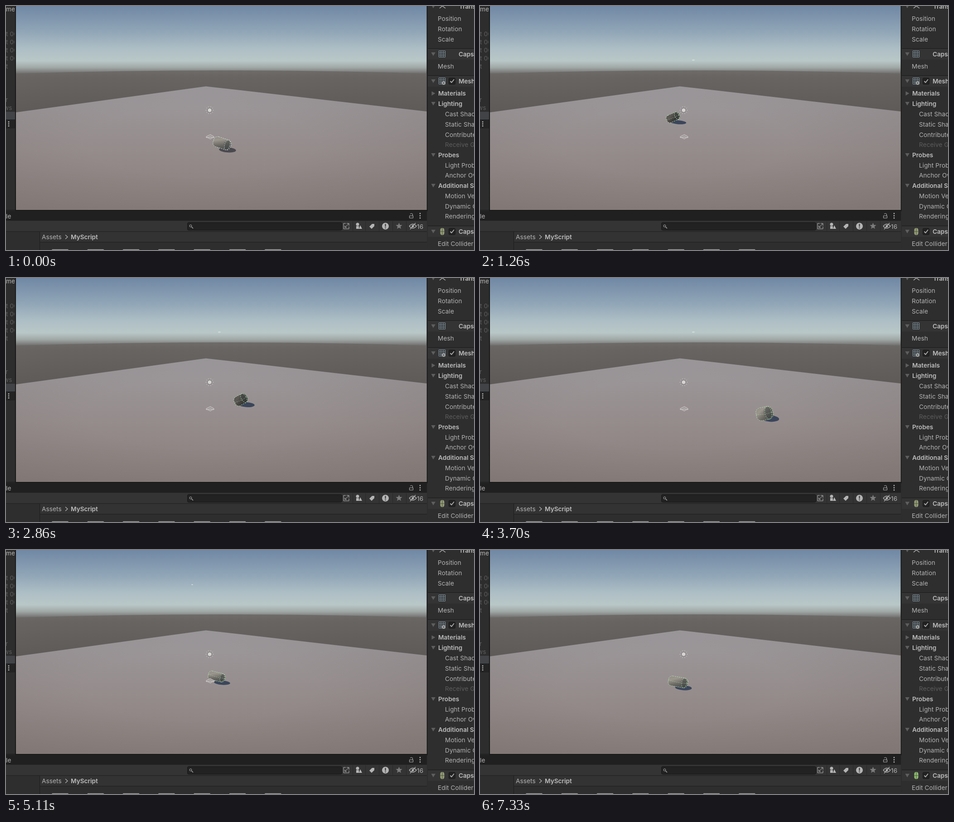
Write an HTML page that moves like this. It is 1033x542 px and loops after 8190 ms.

```html
<!DOCTYPE html>
<html>
<head>
<meta charset="utf-8">
<style>
html, body { margin: 0; width: 100%; height: 100%; overflow: hidden; background: #2d2d2d; }
svg { display: block; width: 1033px; height: 542px; }
text { font: 13.6px Inter, Roboto, sans-serif; letter-spacing: .1px; fill: #b4b4b4; white-space: pre; }
.b { font-weight: 600; letter-spacing: 0; fill: #bdbdbd; }
.d { fill: #5d5d5d; }
.line { fill: none; stroke: #b4b4b4; }
</style>
</head>
<body>
<svg viewBox="0 0 1033 542">
  <defs>
    <linearGradient id="sky" gradientUnits="userSpaceOnUse" x1="0" y1="0" x2="0" y2="152">
      <stop offset="0" stop-color="#7188a5"/>
      <stop offset=".38" stop-color="#91a6b7"/>
      <stop offset=".62" stop-color="#adbec5"/>
      <stop offset=".8" stop-color="#b9c7c7"/>
      <stop offset=".9" stop-color="#a0a8a6"/>
      <stop offset="1" stop-color="#696765"/>
    </linearGradient>
    <linearGradient id="land" x2="0" y2="1">
      <stop offset="0" stop-color="#6e6b69"/>
      <stop offset=".15" stop-color="#676461"/>
      <stop offset="1" stop-color="#5c5957"/>
    </linearGradient>
    <linearGradient id="plane" x2="0" y2="1">
      <stop offset="0" stop-color="#9d9a9d"/>
      <stop offset=".5" stop-color="#958c8c"/>
      <stop offset="1" stop-color="#897f7c"/>
    </linearGradient>
    <radialGradient id="dim" cx=".45" cy=".45" r=".7">
      <stop offset=".4" stop-color="#443b39" stop-opacity="0"/>
      <stop offset="1" stop-color="#443b39" stop-opacity=".12"/>
    </radialGradient>
    <linearGradient id="skin" x2=".8" y2="1">
      <stop offset="0" stop-color="#8d8a82"/>
      <stop offset=".3" stop-color="#9b968e"/>
      <stop offset=".65" stop-color="#6c6a64"/>
      <stop offset="1" stop-color="#484b4a"/>
    </linearGradient>
    <clipPath id="side"><rect width="19" height="453"/></clipPath>
  </defs>

  <!-- Scene view -->
  <rect x="20" width="911" height="456" fill="#191919"/>
  <rect x="22" width="906.500" height="453" fill="url(#sky)"/>
  <path d="M22 150Q475 136 928.500 150V245H22Z" fill="url(#land)"/>
  <path d="M22 236.300L441 178.400L928.500 234.300V453H22Z" fill="url(#plane)"/>
  <path d="M22 236.300L441 178.400L928.500 234.300V453H22Z" fill="url(#dim)"/>
  <ellipse id="speck" fill="#d0dbd8"/>
  <g id="sun" stroke="#d2d0cd" stroke-width=".8">
    <circle cx="449.500" cy="231.500" r="3.800" fill="#d6d4d1"/>
    <circle cx="449.500" cy="231.500" r="5" fill="none" stroke="#716c6d"/>
  </g>
  <g id="stage">
    <path id="gizmo" d="M442 290L451 285.500L459 290V292.500L451 291L442 292.500Z M442 291L451 295.500L459 291" fill="#a09a9a" stroke="#d2d0ce"/>
    <g id="actor">
      <ellipse id="shadow"/>
      <g id="capsule">
        <rect id="shell" fill="url(#skin)"/>
        <ellipse id="cap" fill="#3f4444" fill-opacity=".5"/>
        <g id="wire" fill="none" stroke-width=".9" stroke-dasharray="2.500 2">
          <rect id="edge"/>
          <ellipse id="ring"/>
          <path id="spine"/>
        </g>
      </g>
    </g>
  </g>

  <!-- Hierarchy -->
  <rect width="20" height="453" fill="#2d2d2d"/>
  <rect y="235" width="20" height="17" fill="#414347"/>
  <rect y="252" width="20" height="20" fill="#232323"/>
  <g id="tree" clip-path="url(#side)"></g>

  <!-- Project -->
  <rect y="455" width="929" height="23" fill="#202020"/>
  <rect y="477" width="929" height="24" fill="#343434"/>
  <path d="M0 453.500H929" stroke="#171717"/>
  <rect y="501" width="929" height="41" fill="#2e2e2e"/>
  <rect x="75" y="501" width="854" height="24" fill="#333"/>
  <path d="M0 501H929M74.500 501V542M75 524.500H929" stroke="#1d1d1d"/>
  <rect x="400.500" y="481" width="341" height="17" rx="3" fill="#222" stroke="#151515"/>
  <path d="M765.500 478V500M793.500 478V500M823.500 478V500M853.500 478V500M883.500 478V500" stroke="#292929"/>
  <circle class="line" cx="407.500" cy="488.500" r="2.400"/>
  <path class="line" d="M409.500 490.500L413 494" stroke-width="1.300"/>
  <path class="line" d="M750 483H745V495H757V490M749 491L757 483M752 483H757V488M748 488V492H752"/>
  <g fill="#b4b4b4">
    <circle cx="776" cy="485" r="3.500"/>
    <path d="M773 489H779V495H773ZM782 487L786 495H779Z"/>
    <path d="M802 490L808 484H813V489L807 495Z"/>
    <circle cx="837.500" cy="489" r="7.500"/>
    <path id="star" fill="#7c7c7c"/>
    <circle cx="914" cy="461" r="1.400"/><circle cx="914" cy="466" r="1.400"/><circle cx="914" cy="471" r="1.400"/>
    <circle cx="6" cy="257.500" r="1.400"/><circle cx="6" cy="262" r="1.400"/><circle cx="6" cy="266.500" r="1.400"/>
  </g>
  <path d="M837.500 484V490.500M837.500 492V494" stroke="#333" stroke-width="2"/>
  <path class="line" d="M890 489Q898 480 906 489Q898 498 890 489M892 496L904 482" stroke-width="1.300"/>
  <circle cx="898" cy="489" r="2.500" fill="#b4b4b4"/>
  <path class="line" d="M890.500 466H898.500V471H890.500ZM892 462Q895 459.500 897.500 462V466"/>
  <path class="line" d="M131 508.500L136 513L131 517.500" stroke-width="1.300"/>
  <g id="folders" fill="#a8a8a8"></g>

  <!-- Inspector -->
  <rect x="930.500" width="103" height="542" fill="#2e2e2e"/>
  <g id="heads"></g>
  <g id="folds" fill="#5e5e5e"></g>
  <path class="line" d="M957 5L963 0L970 5M963 0V-3" stroke-width="1.500"/>
  <g class="line" style="stroke: #8397a4">
    <path d="M955.500 99.500H969.500V113.500H955.500ZM960 99V114M965 99V114M955 104H970M955 109H970"/>
    <path d="M955.500 159.500H969.500V173.500H955.500ZM960 159V174M965 159V174M955 164H970M955 169H970"/>
  </g>
  <circle cx="966" cy="171" r="4" fill="#a5a8a8"/>
  <circle cx="966" cy="171" r="1.500" fill="#444"/>
  <g id="checks"></g>
  <rect id="pill" x="958.500" y="493" width="9" height="16" rx="4.500"/>
  <path d="M963 493V509M958.500 501H967.500" stroke="#45503b"/>
  <g id="labels"></g>
</svg>
<script>
const $ = id => document.getElementById(id);
const set = (id, attrs) => { for (const k in attrs) $(id).setAttribute(k, attrs[k]); };
const put = (id, html) => $(id).innerHTML += html;
const label = (x, y, s, cls = '') => `<text x="${x}" y="${y + 5}" class="${cls}">${s}</text>`;

// Static interface
put('tree', label(0, 7, 'me') + [62, 80, 98, 116].map(y => label(0, y, 't 00', 'd')).join('') +
  label(0, 134, 't', 'd') + label(-1, 208, 'r', 'd') + label(-5, 226, 'ws', 'd'));

const rows = [
  [953, 28, 'Position'], [953, 51, 'Rotation'], [953, 74, 'Scale'], [953, 134, 'Mesh'],
  [969, 240, 'Cast Shadows'], [969, 263, 'Static Shadow'], [969, 286, 'Contribute'],
  [969, 308, 'Receive GI', 'd'], [969, 354, 'Light Probes'], [969, 376, 'Anchor Override'],
  [969, 422, 'Motion Vectors'], [969, 445, 'Dynamic Occ'], [969, 467, 'Rendering'],
  [953, 528, 'Edit Collider'], [1000, 1, 'Transform', 'b'], [999, 107, 'Capsule', 'b'],
  [999, 167, 'Mesh Renderer', 'b'], [954, 194, 'Materials', 'b'], [954, 217, 'Lighting', 'b'],
  [954, 331, 'Probes', 'b'], [954, 399, 'Additional Settings', 'b'], [999, 501, 'Capsule', 'b'],
  [0, 467, 'le'], [79, 513, 'Assets'], [143, 513, 'MyScript', 'b'], [907, 490, '16']
];
put('labels', rows.map(r => label(...r)).join(''));
put('heads', [94, 154, 488].map(y =>
  `<path d="M931 ${y}H1033V${y + 25}H931Z" fill="#343434"/><path d="M931 ${y}.5H1033" stroke="#191919"/>`).join(''));
put('folds', [1, 107, 167, 217, 331, 399, 501].map(y => `<path d="M938.500 ${y - 4}H948L943 ${y + 4}Z"/>`).join('') +
  '<path d="M939.500 189.500V199L947.500 194Z"/>');
put('checks', [167, 501].map(y =>
  `<rect x="977.500" y="${y - 7}" width="14" height="14" rx="2" fill="#222" stroke="#161616"/>
   <path class="line" d="M980.500 ${y}L983.500 ${y + 3}L989 ${y - 4}" stroke-width="1.800"/>`).join(''));
for (let i = 0; i < 7; i++) put('folders', `<rect x="${101 + 78.3 * i}" y="540.600" width="37" height="8" rx="2"/>`);
let rays = '', star = '';
for (let i = 0; i < 10; i++) {
  const a = i * Math.PI / 5, c = Math.cos(a), s = Math.sin(a), r = i % 2 ? 3.3 : 7.5;
  rays += `M${449.5 + 6.5 * c} ${231.5 + 6.5 * s}l${2.5 * c} ${2.5 * s}`;
  star += `${i ? 'L' : 'M'}${867.5 + r * s} ${489 - r * c}`;
}
put('sun', `<path d="${rays}"/>`);
set('star', { d: star + 'Z' });

// Capsule poses: step, x, y, tilt, length, radius
const poses = [
  [0, 477, 305, 18, 40, 11.5], [1, 477, 305, 18, 40, 11.5], [6, 520, 285, 10, 37, 11],
  [9, 505, 269, 4, 35, 10], [12, 474, 261, -8, 33, 9.5], [23, 386, 236, -38, 28, 8],
  [25, 386, 235, -40, 28, 8], [28, 399, 237, -40, 28, 8], [37, 472, 258, -35, 27, 9.5],
  [49, 611, 295, -16, 36, 14], [51, 634, 304, -13, 38, 14.5], [53, 628, 301, -12, 37, 14.5],
  [61, 528, 286, 4, 36, 12], [67, 470, 268, 10, 36, 10], [73, 465, 281, 14, 38, 9.5],
  [82, 377, 319, 22, 43, 13], [85, 387, 313, 20, 42, 13], [94, 437, 293, 10, 43, 11]
];
function poseAt(n) {
  const i = poses.findIndex(p => p[0] > n);
  if (i < 0) return poses.at(-1);
  const a = poses[i - 1], b = poses[i], k = (n - a[0]) / (b[0] - a[0]);
  return a.map((v, j) => v + (b[j] - v) * k);
}

const LOOP = 8190, STEP = 70;
function draw(now) {
  const n = Math.floor((now % LOOP + 20) / STEP);
  const [, x, y, tilt, len, r] = poseAt(n);
  const h = len / 2, joint = h - r * .7;
  const box = { x: -h, y: -r, width: len, height: 2 * r, rx: r * .75 };
  const cx = x + 12, cy = y + 11 + Math.max(0, tilt) * .2;
  set('shadow', { cx, cy, rx: r / 2 + 13, ry: r * .5,
    transform: `rotate(4 ${cx} ${cy})`, fill: n < 1 ? '#4a494e' : '#3b465b' });
  set('capsule', { transform: `translate(${x} ${y}) rotate(${tilt})` });
  set('shell', box);
  set('edge', box);
  set('cap', { cx: joint, rx: r * .65, ry: r * .9 });
  set('ring', { cx: joint, rx: r * .5, ry: r });
  set('spine', { d: `M${-h} ${-r * .1}Q0 ${r * .25} ${h} 0` });
  $('spine').style.opacity = n < 1 ? 0 : .6;
  set('wire', { stroke: n < 1 ? '#d3e5df' : '#b5e3b2' });
  $('shell').style.filter = tilt < -20 ? 'brightness(.6)' : '';
  const near = y + r > 300;
  if (near !== ($('stage').lastElementChild === $('actor'))) $('stage').append($(near ? 'actor' : 'gizmo'));
  const [sx, sy, sr] = n < 11 ? [0, 0, 0] : n < 56 ? [471, 120, 3] : n < 72 ? [446, 109, .8]
    : n < 75 ? [411, 77, 2] : [446, 109, .8];
  set('speck', { cx: sx, cy: sy, rx: sr, ry: sr / 2 });
  set('pill', { fill: n < 97 ? '#969d78' : '#8fbd70' });
}
function tick(now) {
  draw(now);
  requestAnimationFrame(tick);
}
draw(0);
requestAnimationFrame(tick);
</script>
</body>
</html>
```
